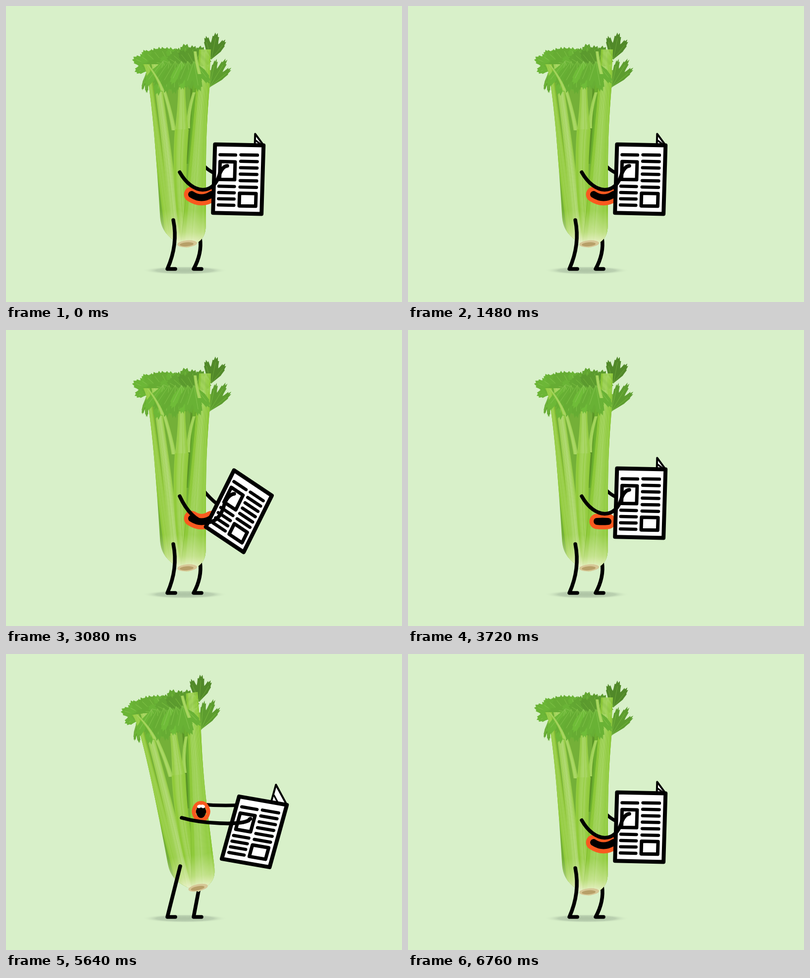
Animation, 800 px wide and 600 px high, one loop 7000 ms. Source, as an HTML page with a canvas:

```html
<!DOCTYPE html>
<html lang="en">
<head>
<meta charset="utf-8">
<title>Celery reading the news</title>
<style>
  html, body { margin: 0; width: 100%; height: 100%; overflow: hidden; background: #d8f0c9; }
  canvas { display: block; width: 800px; height: 600px; }
</style>
</head>
<body>
<canvas id="stage" width="800" height="600"></canvas>
<script>
const ctx = document.getElementById('stage').getContext('2d');
const LOOP = 7000, STEP = 40, RAD = Math.PI / 180;

const mix = (a, b, f) => a + (b - a) * f;
const clamp = x => Math.min(1, Math.max(0, x));
const smooth = x => { x = clamp(x); return x * x * (3 - 2 * x); };
const ramp = (t, from, to) => smooth((t - from) / (to - from));
const bump = (t, from, len) => smooth(1 - Math.abs((t - from) / (len / 2) - 1));
const noise = n => { const v = Math.sin(n * 12.9898 + 4.1) * 43758.5453; return v - Math.floor(v); };

function stroke(width, color = '#000') {
  ctx.lineWidth = width;
  ctx.strokeStyle = color;
  ctx.stroke();
}
function fill(color) {
  ctx.fillStyle = color;
  ctx.fill();
}
function trace(points, close) {
  ctx.beginPath();
  for (const [x, y] of points) ctx.lineTo(x, y);
  if (close) ctx.closePath();
}
function oval(x, y, rx, ry, color, turn = 0) {
  ctx.beginPath();
  ctx.ellipse(x, y, rx, ry, turn, 0, 7);
  fill(color);
}

// ---------- celery ----------
const TOP = 120, BOTTOM = 490;

// Outline of the bunch at height y; both sides close in on the root.
function side(y, right) {
  const s = Math.max(0, (y - TOP) / (BOTTOM - TOP));
  const x = right ? 404 + 12 * Math.max(0, 1 - 1.8 * s) ** 2 : 277 + 38 * s ** 0.55;
  return mix(x, 366, clamp((y - 420) / 70) ** (right ? 5 : 3));
}

function bunchPath() {
  const left = [], right = [];
  for (let y = 88; y <= BOTTOM; y += 3) {
    left.push([side(y, false), y]);
    right.unshift([side(y, true), y]);
  }
  trace([...left, ...right], true);
}

// A band from top to bottom [x, y, width], made of fibres that vary in lightness.
function stalk([x0, y0, w0], [x1, y1, w1], bend, light, hue = 84) {
  const n = Math.ceil(Math.max(w0, w1) / 2.5);
  const edge = f => Array.from({ length: 17 }, (_, i) => {
    const t = i / 16;
    const x = mix(x0, x1, t) + bend * 4 * t * (1 - t);
    return [x + (f - 0.5) * mix(w0, w1, t ** 1.5), mix(y0, y1, t)];
  });
  for (let i = 0; i < n; i++) {
    const l = light + 9 * Math.sin(Math.PI * (i + 0.5) / n) + 6 * (noise(i + x0) - 0.5);
    trace([...edge(i / n), ...edge(Math.min(1, (i + 1.3) / n)).reverse()], true);
    fill(`hsl(${hue},58%,${l}%)`);
  }
}

// A fan of pointed lobes with small teeth, growing from its stem.
function leaf(x, y, size, deg, light, spread = 75) {
  const ray = (a, r) => [x + r * Math.cos((deg + a) * RAD), y + r * Math.sin((deg + a) * RAD)];
  const n = 30, rim = [[x, y]];
  for (let i = 0; i <= n; i++) {
    const f = i / n * 2 - 1;
    const lobe = 0.62 + 0.38 * Math.abs(Math.cos(f * Math.PI * 1.5)) ** 0.8;
    const tooth = i % 2 ? 0.93 : 1.03;
    rim.push(ray(f * spread, size * lobe * tooth * (1 - 0.3 * f * f)));
  }
  trace(rim, true);
  fill(`hsl(95,54%,${light}%)`);
  for (const f of [-0.67, 0, 0.67]) {
    trace([[x, y], ray(f * spread, size * (0.8 - 0.2 * Math.abs(f)))]);
    stroke(1, `hsl(92,50%,${light + 8}%)`);
  }
}

function drawLeaves() {
  leaf(415, 108, 54, -79, 35, 40);
  leaf(411, 165, 66, -59, 40, 28);
  leaf(283, 136, 40, 88, 43, 24);
  for (let i = 0; i < 10; i++) {
    leaf(291 + i * 10, 120, 34 + 9 * noise(i), mix(-158, -68, i / 9), 46 - i + 5 * noise(i + 20));
  }
}

function drawHangingLeaves() {
  for (let i = 0; i < 6; i++) {
    leaf(317 + i * 12.5, 112, 52 + 18 * noise(i + 7), 100 - i * 4, 43 + 6 * noise(i + 31), 42);
  }
}

function drawCelery(lean) {
  ctx.save();
  ctx.translate(392.5 - 4 * lean, 272 - 10 * lean);
  ctx.rotate(-7.1 * RAD * lean);
  ctx.translate(-392.5, -272);
  drawLeaves();
  ctx.save();
  bunchPath();
  ctx.clip();
  ctx.fillStyle = '#74b038';
  ctx.fillRect(260, 130, 170, 370);
  stalk([284, 118, 14], [335, 490, 20], 0, 47);
  stalk([301, 118, 14], [345, 488, 25], 3, 55);
  stalk([300, 118, 6], [339, 252, 9], 4, 54);
  stalk([380, 140, 14], [370, 320, 16], 2, 34, 92);
  stalk([380, 175, 6], [368, 248, 8], -3, 53);
  stalk([355, 165, 14], [355, 253, 27], 0, 52);
  stalk([355, 250, 28], [364, 490, 18], -7, 49);
  stalk([402, 88, 24], [379, 490, 56], 0, 50, 85);
  const pale = ctx.createLinearGradient(0, 415, 0, 487);
  pale.addColorStop(0, 'rgba(240,246,205,0)');
  pale.addColorStop(0.6, 'rgba(240,246,205,.45)');
  pale.addColorStop(1, 'rgba(246,246,222,.95)');
  ctx.fillStyle = pale;
  ctx.fillRect(300, 410, 120, 90);
  ctx.restore();
  drawHangingLeaves();
  stalk([287, 120, 4], [316, 172, 8], 3, 52);
  stalk([382, 92, 6], [391, 138, 7], -1, 53);
  oval(366, 482, 20, 7, '#d6c796', -0.08);
  oval(365, 483, 14, 4, '#b79f68', -0.08);
  ctx.restore();
}

// ---------- limbs ----------
function drawLeg([hipX, hipY], footX, bow) {
  ctx.beginPath();
  ctx.moveTo(hipX, hipY);
  ctx.quadraticCurveTo((hipX + footX) / 2 + bow, (hipY + 533) / 2, footX, 533);
  ctx.lineTo(footX + 16, 533);
  stroke(7.5);
}

// The arm keeps its length, so it sags more when the hand comes closer.
function sagOf([sx, sy], [hx, hy]) {
  const d = Math.hypot(hx - sx, hy - sy);
  return Math.sqrt(0.375 * d * Math.max(1, 140.5 - d));
}

function drawFrontArm([sx, sy], [hx, hy], sag) {
  const curl = sag / 40, wx = hx - 15 * curl, wy = hy + 15 * curl;
  const dip = y => y + sag * 1.15;
  ctx.beginPath();
  ctx.moveTo(sx, sy);
  ctx.bezierCurveTo(mix(sx, wx, 0.32), dip(mix(sy, wy, 0.32)),
                    mix(sx, wx, 0.86), dip(mix(sy, wy, 0.86)), wx, wy);
  ctx.quadraticCurveTo(hx - 9 * curl, hy + curl, hx, hy);
  stroke(7.5);
}

function drawBackArm([hx, hy], sag) {
  ctx.beginPath();
  ctx.moveTo(383, 304);
  ctx.quadraticCurveTo((383 + hx) / 2, (304 + hy) / 2 + sag * 0.35, hx, hy);
  stroke(7);
}

// ---------- mouth: centre x, y, half width, smile, opening ----------
const SMILE = [395, 382, 20, 13, 0];
const SMALL = [393, 388, 11, 0, 1];
const OPEN = [394, 319, 3, 0, 12];
const GRIN = [396, 343, 20, 12, 1];
const mouthKeys = [[3600, SMILE], [3720, SMALL], [4320, OPEN], [5600, OPEN], [6120, GRIN], [6680, SMILE]];

function mouthAt(t) {
  const i = mouthKeys.findIndex(([time]) => t < time);
  if (i < 1) return SMILE;
  const [t0, a] = mouthKeys[i - 1], [t1, b] = mouthKeys[i];
  return a.map((v, j) => mix(v, b[j], ramp(t, t0, t1)));
}

function drawMouth([x, y, half, curve, gap]) {
  ctx.beginPath();
  ctx.moveTo(x - half, y);
  ctx.quadraticCurveTo(x, y + curve - gap, x + half, y);
  ctx.quadraticCurveTo(x, y + curve + gap, x - half, y);
  ctx.closePath();
  stroke(31, '#f9591f');
  stroke(14);
  fill('#000');
  const teeth = clamp((gap - 4) / 8);
  if (teeth > 0) {
    for (const dir of [-1, 1]) oval(x + 3.5 * dir, y - 10.5, 4.5 * teeth, 3.5 * teeth, '#fff', 0.3 * dir);
  }
}

// ---------- paper: hand x, y, slope of top, slope of side, width, height, hand position across ----------
const paper = {
  rest: [447, 324, 1.2, 1.7, 98, 139, 0.265],
  tilt: [461, 332, 34, 26.5, 92, 128, 0.235],
  lean: [494, 334, 10, 15.5, 98, 131, 0.35]
};
const blend = ({ rest, tilt, lean }, k, p) =>
  rest.map((v, i) => v + (tilt[i] - v) * k + (lean[i] - v) * p);

function drawPaper([x, y, a, b, w, h, grip], tilt, lean) {
  const at = (u, v) => {
    const along = (u - grip) * w, down = (v - 0.31) * h;
    return [x + along * Math.cos(a * RAD) - down * Math.sin(b * RAD),
            y + along * Math.sin(a * RAD) + down * Math.cos(b * RAD)];
  };
  const rule = (u0, u1, v) => { trace([at(u0, v), at(u1, v)]); stroke(6.5); };
  const box = (u0, u1, v0, v1) => trace([at(u0, v0), at(u1, v0), at(u1, v1), at(u0, v1)], true);

  // back page peeking out
  const fold = 0.82 - 0.15 * lean, peak = -(0.165 + 0.115 * lean) * clamp(1 - tilt);
  trace([at(fold, peak), at(1, 0), at(fold, 0)], true);
  fill('#fff');
  stroke(4);
  trace([at(fold + 0.02, peak * 0.4), at(fold + 0.15, 0)]);
  stroke(3.5);

  box(0, 1, 0, 1);
  fill('#fff');
  stroke(8);
  rule(0.11, 0.43, 0.15);
  box(0.115, 0.425, 0.25, 0.51);
  stroke(7);
  for (let i = 0; i < 4; i++) rule(0.105, 0.425, 0.61 + i * 0.091);
  for (let i = 0; i < 6; i++) rule(0.54, 0.88, 0.145 + i * 0.094);
  box(0.535, 0.875, 0.705, 0.89);
  stroke(7);
}

// ---------- scene ----------
function drawShadow() {
  ctx.save();
  ctx.translate(361, 536);
  ctx.scale(1, 0.1);
  const g = ctx.createRadialGradient(0, 0, 15, 0, 0, 86);
  g.addColorStop(0, '#afc5a6');
  g.addColorStop(0.6, '#bad0b0');
  g.addColorStop(1, 'rgba(216,240,201,0)');
  oval(0, 0, 86, 86, g);
  ctx.restore();
}

function swing(angle, draw) {
  ctx.save();
  ctx.translate(355, 332);
  ctx.rotate(angle * RAD);
  ctx.translate(-355, -332);
  draw();
  ctx.restore();
}

function render(t) {
  const lean = ramp(t, 3720, 4320) * (1 - ramp(t, 5600, 6680));
  const tilt = (bump(t, 520, 960) + bump(t, 2520, 960)) / 0.93;
  const shake = 5 * (bump(t, 4320, 480) + bump(t, 4880, 480));
  const sheet = blend(paper, tilt, lean);
  const shoulder = [351 + 4 * lean, 337 - 5 * lean];
  const hand = sheet.slice(0, 2);
  const sag = sagOf(shoulder, hand);

  ctx.fillStyle = '#d8f0c9';
  ctx.fillRect(0, 0, 800, 600);
  ctx.lineCap = ctx.lineJoin = 'round';
  drawShadow();
  drawLeg([392 - 2 * lean, 470 + 5 * lean], 379, 11 * (1 - lean));
  swing(shake, () => drawBackArm([430 + 10 * tilt + 45 * lean, 342 + 20 * tilt - 36 * lean], sag));
  drawCelery(lean);
  drawLeg([338 + 14 * lean, 434 - 4 * lean], 326, 16 * (1 - lean));
  drawMouth(mouthAt(t));
  swing(shake, () => {
    drawPaper(sheet, tilt, lean);
    drawFrontArm(shoulder, hand, sag + 16 * tilt);
  });
}

const start = performance.now();
function tick() {
  const t = (performance.now() - start) % LOOP;
  render(Math.floor(t / STEP) * STEP);
  requestAnimationFrame(tick);
}
tick();
</script>
</body>
</html>
```
